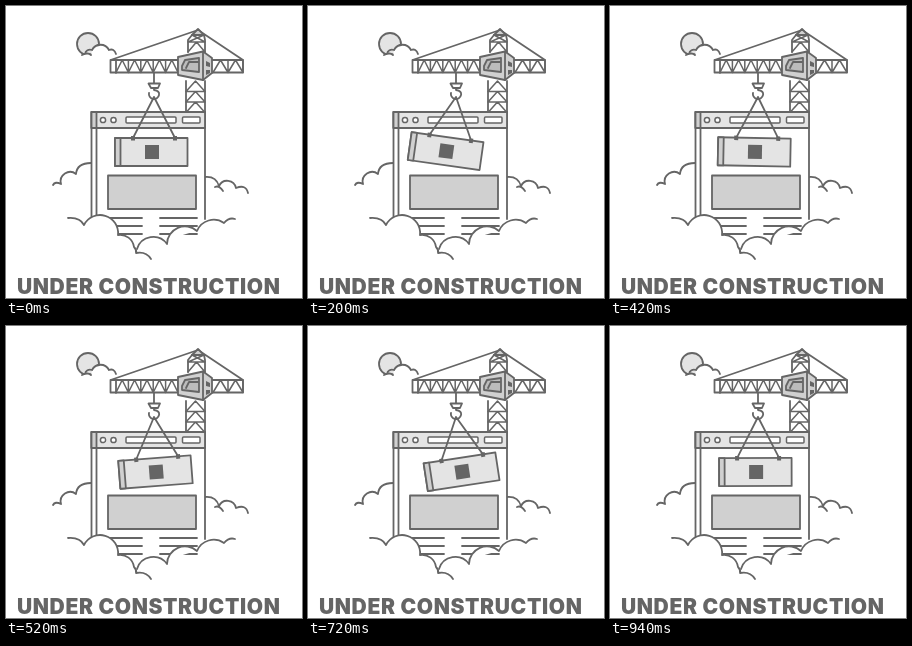
Recreate the animation shown at these times as an HTML page. Size 296x292 px, loop 0.96 s.

```html
<!DOCTYPE html>
<html lang="en">
<head>
<meta charset="utf-8">
<style>
  html, body { margin: 0; width: 100%; height: 100%; overflow: hidden; background: #fff; }
  svg { display: block; width: 296px; height: 292px; }
  .art { fill: none; stroke: #656565; stroke-width: 1.8; stroke-linecap: round; stroke-linejoin: round; }
  .white { fill: #fff; }
  .light { fill: #e4e4e4; }
  .mid { fill: #d0d0d0; }
  .dark { fill: #656565; stroke: none; }
  text { font: 900 21px Inter, "Open Sans", sans-serif; letter-spacing: .65px; fill: #656565; }
</style>
</head>
<body>
<svg viewBox="0 0 296 292">
  <g class="art">
    <!-- sun -->
    <circle class="light" cx="82" cy="38" r="11"/>
    <path class="white" stroke="none" d="M76 49Q82 46 85 49A10 10 0 0 1 103 44V52H76Z"/>
    <path d="M76 49Q82 46 85 49M79 48A5 5 0 0 1 86 44A9.500 9.500 0 0 1 103 44Q108 42 110 48"/>

    <!-- side clouds -->
    <path d="M47 179Q49 175 55 178A9.500 9.500 0 0 1 70 168Q71 157 85 157"/>
    <path d="M199 171Q210 170 213 180A9 9 0 0 1 230 182Q240 178 242 187M217 185Q213 179 209 181"/>

    <!-- crane -->
    <path d="M192 24L104.500 54H172M192 24L237 54H206M104.500 54V66.500H172M110 54V67M237 54V66.500H206M180 75V106M199 75V106M182 46V34L186 29H198L199 34V46"/>
    <path class="mid" d="M192 23L198 29H186Z"/>
    <path id="braces" stroke-width="1.5"/>

    <!-- cab -->
    <path class="mid" d="M172 51L197 45.500L206 52V67L197 74L172 69Z"/>
    <path d="M197 45.500V74"/>
    <path fill="#bcbcbc" d="M179 54L193 52V66L176 64V60Z"/>
    <path d="M180 62L183 56H192"/>
    <path class="dark" d="M200 55L204 57V61L200 60ZM200 64L204 64V67L200 69Z"/>

    <!-- window -->
    <path class="white" d="M85.500 213V106H199V213"/>
    <path class="light" d="M85.500 106H199V122H85.500Z"/>
    <path class="mid" d="M85.500 106H90.500V122H85.500Z"/>
    <path d="M90.500 122V213"/>
    <g class="white" stroke-width="1.5">
      <circle cx="97" cy="114" r="2.6"/>
      <circle cx="107.5" cy="114" r="2.6"/>
      <rect x="120" y="111" width="50" height="6" rx="1"/>
      <rect x="176.500" y="111" width="17.500" height="6" rx="1"/>
    </g>
    <path class="mid" d="M102 169.500H190V203H102Z"/>
    <path d="M98 212H136M154 212H191M98 220H136M154 220H191M98 228H136M154 228H191"/>

    <!-- front clouds, stepping down to the middle -->
    <path class="white" d="M62 212Q74 211 78 219A18 18 0 0 1 112 229A14 14 0 0 1 128 241Q131 244 130 247Q140 245 145 253"/>
    <path class="white" d="M131 243A17 17 0 0 1 161 238A18 18 0 0 1 191 225A18 18 0 0 1 218 217Q223 211 229 213"/>

    <!-- hook -->
    <path d="M148 67V77M148 82V84Q154 85 153 89A5 5 0 0 1 143 87"/>
    <path class="white" d="M142.500 77.500H154L152 82H145Z"/>

    <!-- load -->
    <g id="load">
      <path d="M148 91L127 132M148 91L169 132"/>
      <path class="light" d="M109 132H181.500V160H109Z"/>
      <path class="mid" d="M109 132H114.500V160H109Z"/>
      <path class="dark" d="M125 130H129V134.500H125ZM167 130H171V134.500H167Z"/>
      <rect class="dark" x="139" y="139" width="14" height="14"/>
    </g>
  </g>
  <text x="11" y="287.5">UNDER CONSTRUCTION</text>
</svg>
<script>
  const LOOP = 960, STEP = 20;
  // [time in ms, swing in degrees]
  const keys = [[0, 0], [190, 8], [220, 8], [680, -9.2], [960, 0]];
  const load = document.getElementById("load");

  function swing(t) {
    const i = keys.findIndex(k => k[0] > t);
    const [t0, a] = keys[i - 1], [t1, b] = keys[i];
    const u = (t - t0) / (t1 - t0);
    return a + (b - a) * u * u * (3 - 2 * u);
  }

  let d = "";
  function jib(x0, x1, n) {
    const w = (x1 - x0) / n;
    for (let x = x0; x < x1 - 1; x += w)
      d += `M${x} 66.5L${x + w / 2} 54L${x + w} 66.5V54`;
  }
  const mast = (y, h) => d += `M180 ${y + h}L189.5 ${y}L199 ${y + h}H180`;
  jib(110, 172, 5);
  jib(207, 237, 2);
  [75, 85.5, 96].forEach(y => mast(y, 10.5));
  d += "M182 46L190.5 36L199 46M182 36H199M186 29L199 36M198 29L182 36";
  document.getElementById("braces").setAttribute("d", d);

  function frame(now) {
    const t = Math.floor(now % LOOP / STEP) * STEP;
    load.setAttribute("transform", `rotate(${swing(t)} 148 91)`);
    requestAnimationFrame(frame);
  }
  requestAnimationFrame(frame);
</script>
</body>
</html>
```
